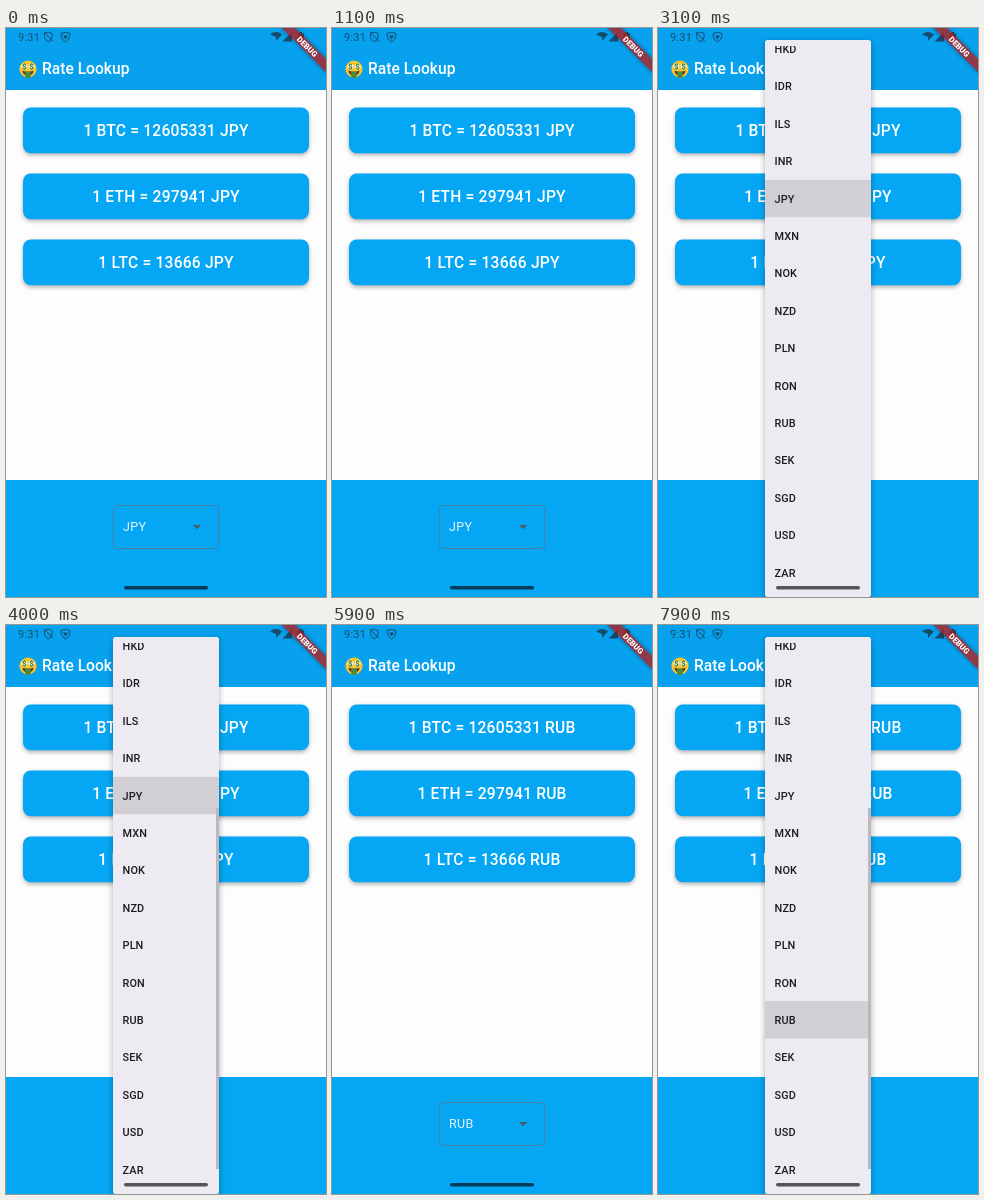
Write an HTML page that moves like this. It is 320 by 569 pixels and loops after 8000 ms.

```html
<!DOCTYPE html>
<html lang="en">
<head>
<meta charset="utf-8">
<title>Rate Lookup</title>
<style>
  html, body { margin: 0; width: 100%; height: 100%; overflow: hidden; background: #fdfdfe; }
  svg { display: block; width: 320px; height: 569px; font-family: Roboto, sans-serif; }
  .blue { fill: #05a6f3; }
  .card { filter: drop-shadow(0 2px 2px rgba(0, 0, 0, .3)); }
  .rate { fill: #fff; font-size: 15.6px; font-weight: 500; letter-spacing: .2px; text-anchor: middle; }
  .item { fill: #1d1b20; font-size: 10.9px; font-weight: 500; letter-spacing: .08px; }
  #panel { fill: #eeeaf1; filter: drop-shadow(0 2px 3px rgba(0, 0, 0, .3)); }
</style>
</head>
<body>
<svg viewBox="0 0 320 569">
  <defs>
    <clipPath id="viewport"><rect id="viewportRect" x="107" width="106"/></clipPath>
  </defs>
  <rect width="320" height="569" fill="#fdfdfe"/>
  <rect width="320" height="62" fill="#07a1ee"/>
  <rect class="blue" y="452" width="320" height="117"/>

  <!-- status bar -->
  <g fill="#154d6d">
    <text x="12" y="13" font-size="11" letter-spacing=".2">9:31</text>
    <path d="M270 9 l-6 -2.6 q6 -4.6 12 0 l-6 6.6 z"/>
    <path d="M286 4 v9.5 h-9.5 z"/>
    <path d="M291.5 5.5 h2 v-1.5 h2.5 v1.5 h2 v8.5 h-6.5 z"/>
    <g fill="none" stroke="#154d6d">
      <path d="M38.5 5.5 l3.8 -1.4 3.8 1.4 v3 q0 3.6 -3.8 5.3 q-3.8 -1.7 -3.8 -5.3 z M38 4 l9 9.5"/>
      <path d="M55 5.5 l4.5 -1.2 4.5 1.2 q0 6 -4.5 8.5 q-4.5 -2.5 -4.5 -8.5 z"/>
    </g>
    <path d="M57 7.5 h5 l-2.5 4 z"/>
  </g>

  <!-- title -->
  <g transform="translate(22 41)">
    <circle r="8.6" fill="#fcc42d"/>
    <path d="M-5.5 1.5 q5.5 2.4 11 0 q-.3 5 -5.5 5 q-5.2 0 -5.5 -5z" fill="#5b3b25"/>
    <path d="M-2.8 2.5 h5.6 v5.5 q-2.8 1.8 -5.6 0 z" fill="#4a8b3c"/>
    <g fill="#33772d" font-size="8" font-weight="700" text-anchor="middle">
      <circle cx="-3.6" cy="-2.6" r="3" fill="#f4f3dc"/>
      <circle cx="3.6" cy="-2.6" r="3" fill="#f4f3dc"/>
      <text x="-3.6" y="0">$</text><text x="3.6" y="0">$</text>
    </g>
  </g>
  <text x="36" y="46.3" fill="#fff" font-size="15.6" font-weight="500">Rate Lookup</text>

  <g id="cards"></g>

  <!-- currency button -->
  <rect x="107.5" y="477.5" width="105" height="43" rx="3" fill="none" stroke="#477f9e"/>
  <text id="choice" x="117" y="503.2" fill="#e6f5fe" font-size="12.5" letter-spacing=".4"></text>
  <path d="M187 497 h8.2 l-4.1 4.2 z" fill="#455e6c"/>
  <circle id="touch" cx="151" cy="396" r="7" fill="none" stroke="#f5f5f6"/>

  <g id="menu">
    <rect id="panel" x="107" width="106" rx="2.5"/>
    <g clip-path="url(#viewport)">
      <rect id="highlight" x="107" width="106" height="37.4" fill="#d1ced4"/>
      <g id="items"></g>
    </g>
    <rect id="scrollbar" x="210" y="183" width="3" height="361" fill="#bbb8be"/>
  </g>

  <rect x="118" y="558" width="84" height="3.4" rx="1.7" fill="#000" opacity=".64"/>

  <g transform="translate(320 0) rotate(45)">
    <rect x="-32" y="21.8" width="64" height="9.4" fill="#b71c1c" opacity=".78"
          style="filter: drop-shadow(0 0 2px rgba(0, 0, 0, .5))"/>
    <text y="29.3" fill="#fff" font-size="7.9" font-weight="900" text-anchor="middle">DEBUG</text>
  </g>
</svg>
<script>
const LOOP = 8000;
const OPENINGS = [[2800, 4050], [6400, Infinity]];
const RATE_CHANGE = 4900;
const MENU_TOP = 12, MENU_BOTTOM = 569, PADDING = 6;
const ROW = 37.4, FIRST_ROW = -203.5;
const currencies = ("AUD BRL CAD CNY EUR GBP HKD IDR ILS INR JPY " +
  "MXN NOK NZD PLN RON RUB SEK SGD USD ZAR").split(" ");
const coins = [["BTC", 12605331], ["ETH", 297941], ["LTC", 13666]];

const $ = id => document.getElementById(id);
const clamp = v => Math.max(0, Math.min(1, v));
const ramp = (t, from, to) => clamp((t - from) / (to - from));
const easeOut = v => 1 - (1 - v) ** 3;

function add(parent, tag, attrs) {
  const el = document.createElementNS("http://www.w3.org/2000/svg", tag);
  set(el, attrs);
  return parent.appendChild(el);
}
function set(el, attrs) {
  for (const key in attrs) el.setAttribute(key, attrs[key]);
}

const rates = coins.map((_, i) => {
  const y = 79.5 + 66 * i;
  add($("cards"), "rect", { class: "blue card", x: 17, y, width: 286, height: 45.8, rx: 7.8 });
  return add($("cards"), "text", { class: "rate", x: 160, y: y + 28.2 });
});
const items = currencies.map((name, i) => {
  const el = add($("items"), "text", { class: "item", x: 116.6, y: FIRST_ROW + ROW * i + 4 });
  el.textContent = name;
  return el;
});

function drawMenu(t, selected) {
  const opening = OPENINGS.find(([start, end]) => t >= start && t < end + 75);
  $("menu").style.display = opening ? "" : "none";
  if (!opening) return;

  const [start, end] = opening;
  const p = clamp((t - start) / 300);
  const grow = easeOut(ramp(p, .25, .5));
  const rowTop = FIRST_ROW + ROW * (selected - .5);
  const top = rowTop + (MENU_TOP - rowTop) * grow;
  const bottom = rowTop + ROW + (MENU_BOTTOM - rowTop - ROW) * grow;
  const inset = PADDING * grow;

  $("menu").setAttribute("opacity", ramp(p, 0, .25) * (1 - ramp(t, end, end + 75)));
  set($("panel"), { y: top, height: bottom - top });
  set($("viewportRect"), { y: top + inset, height: bottom - top - 2 * inset });
  $("highlight").setAttribute("y", rowTop);
  $("scrollbar").setAttribute("opacity", ramp(t, start + 350, start + 650));

  // Rows fade in one after another, from top to bottom.
  const unit = .5 / (items.length + 1.5);
  items.forEach((el, i) => {
    const from = .5 + (i + 1) * unit;
    el.setAttribute("opacity", i === selected ? 1 : ramp(p, from, Math.min(1, from + 1.5 * unit)));
  });
}

function draw(t) {
  const currency = t < RATE_CHANGE ? "JPY" : "RUB";
  rates.forEach((el, i) => {
    el.textContent = `1 ${coins[i][0]} = ${coins[i][1]} ${currency}`;
  });
  $("choice").textContent = currency;
  $("touch").setAttribute("opacity", t >= 4125 && t < 4400 ? 1 : 0);
  drawMenu(t, currencies.indexOf(currency));
}

function tick() {
  draw(performance.now() % LOOP);
  requestAnimationFrame(tick);
}
tick();
</script>
</body>
</html>
```
